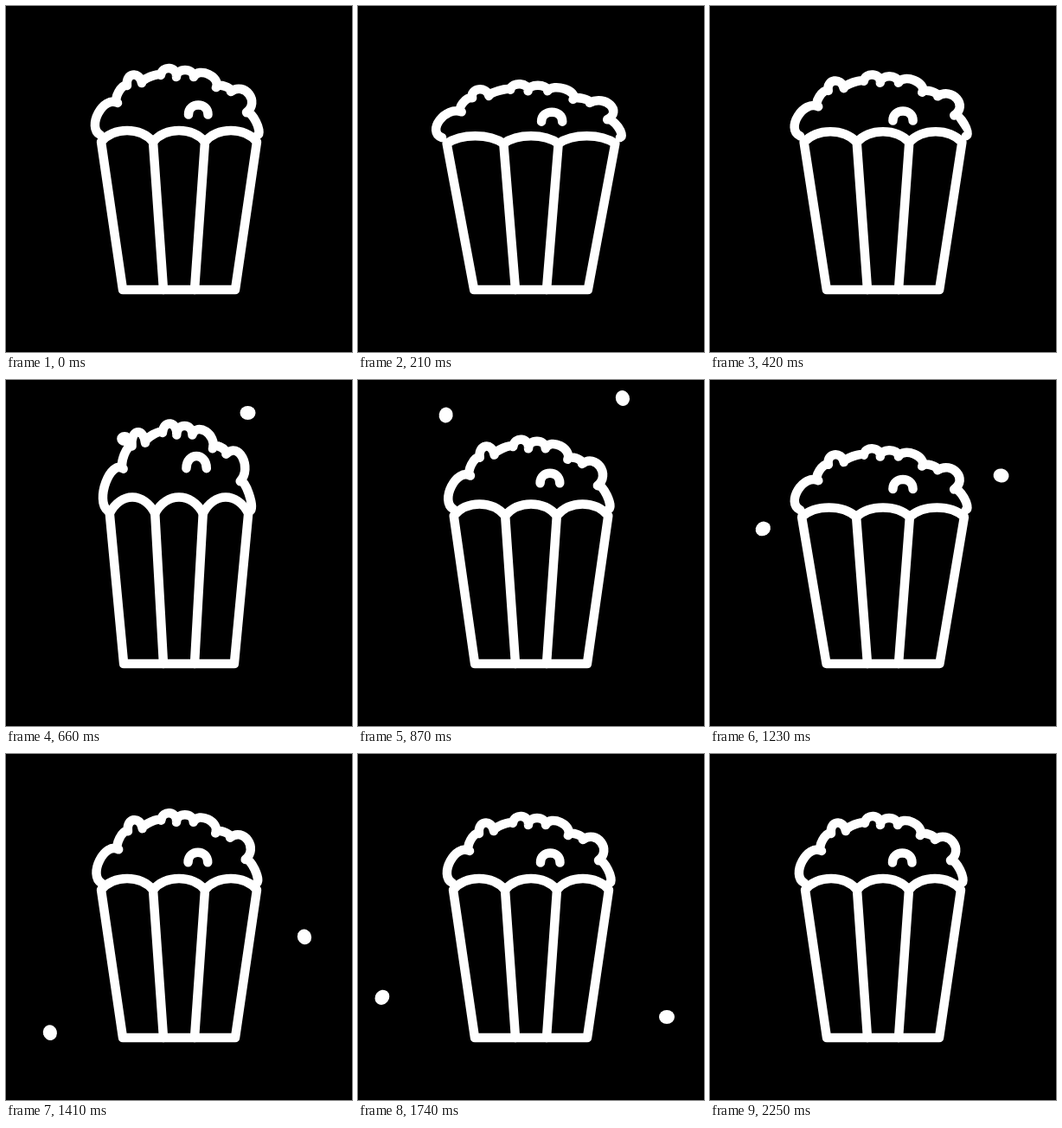
An HTML page for the animation above (2.37 s loop, 400 by 400 pixels).

```html
<!DOCTYPE html>
<html lang="en">
<head>
<meta charset="utf-8">
<title>Popcorn</title>
<style>
  html, body { margin: 0; width: 100%; height: 100%; overflow: hidden; background: #000; }
  svg { display: block; width: 100vw; height: 100vh; }
  path { fill: #000; stroke: #fff; stroke-width: 10.5; stroke-linecap: round; stroke-linejoin: round; }
  .open { fill: none; }
  ellipse { fill: #fff; }
</style>
</head>
<body>
<svg viewBox="0 0 400 400">
  <ellipse id="left" rx="9" ry="8"/>
  <ellipse id="right" rx="9" ry="8"/>
  <path id="corn"/>
  <path id="arc" class="open"/>
  <path id="cup"/>
  <path id="ribs" class="open"/>
</svg>
<script>
const LOOP = 2370, STEP = 30, LAST = 2250;
const $ = id => document.getElementById(id);

// [time, value]: positive is squashed, negative is stretched
const cupKeys = [[0, 0], [270, 1.2], [420, .2], [540, -1.1], [610, -1.5], [660, -1.4], [840, -.3], [1060, 1], [1080, 1], [1410, 0]];
const cornKeys = [[0, 0], [270, 1.25], [420, .45], [540, -1.2], [620, -1.75], [660, -1.7], [850, -.4], [1070, 1], [1080, 1], [1410, -.3], [1740, 0]];
const arcKeys = [[0, 0], [290, 10], [420, 7], [540, -13], [620, -23], [660, -22], [870, -6], [1080, 1], [1410, 0]];

// Popcorn outline: [x, y, height of the bump leading here]
const bumps = [
  [109, 149, 0], [129, 112, 14], [140, 92, 5], [157, 89, 11], [179, 80, 3], [197, 82, 9],
  [217, 82, 8], [243, 94, 10], [260, 99, 4], [278, 123, 15], [291, 149, 5]
];

// Monotone cubic interpolation
function sample(keys, t) {
  const n = keys.length;
  if (t >= keys[n - 1][0]) return keys[n - 1][1];
  let i = 0;
  while (t >= keys[i + 1][0]) i++;
  const slope = j => (keys[j + 1][1] - keys[j][1]) / (keys[j + 1][0] - keys[j][0]);
  const tangent = j => {
    if (j === 0 || j === n - 1) return 0;
    const a = slope(j - 1), b = slope(j);
    return a * b <= 0 ? 0 : 2 * a * b / (a + b);
  };
  const [t0, a] = keys[i], [t1, b] = keys[i + 1], d = t1 - t0, u = (t - t0) / d;
  const ease = u * u * (3 - 2 * u);
  return a + (b - a) * ease + d * (tangent(i) * u * (1 - u) ** 2 - tangent(i + 1) * u * u * (1 - u));
}

function cornPath(p) {
  const sx = 1 + p * (p > 0 ? .12 : .055), sy = 1 - .18 * p;
  const base = 148 + (p > 0 ? 3 * p : -p);
  const map = (x, y) => `${200 + (x - 200) * sx} ${base + (y - 148) * sy} `;
  let d = 'M' + map(bumps[0][0], bumps[0][1]);
  for (let i = 1; i < bumps.length; i++) {
    const [x0, y0] = bumps[i - 1], [x1, y1, h] = bumps[i];
    const k = h / .75 / Math.hypot(x1 - x0, y1 - y0);
    const nx = (y1 - y0) * k, ny = (x0 - x1) * k;
    d += 'C' + map(x0 + nx, y0 + ny) + map(x1 + nx, y1 + ny) + map(x1, y1);
  }
  return d;
}

function drawCup(b) {
  const top = 90 + 7 * b, foot = 65 + .8 * b, rib = 30 + 1.6 * b;
  const y = 157 + 2 * b, lift = y - (13 - 4 * b) / .75;
  const xs = [200 - top, 200 - rib, 200 + rib, 200 + top];
  let d = `M${xs[3]} ${y}L${200 + foot} 328H${200 - foot}L${xs[0]} ${y}`;
  for (let i = 0; i < 3; i++) {
    const w = (xs[i + 1] - xs[i]) * .25;
    d += `C${xs[i] + w} ${lift} ${xs[i + 1] - w} ${lift} ${xs[i + 1]} ${y}`;
  }
  $('cup').setAttribute('d', d + 'Z');
  $('ribs').setAttribute('d', `M${xs[1]} ${y}L182 328M${xs[2]} ${y}L218 328`);
}

function drawArc(q, p) {
  const x0 = 211 + (p > 0 ? p : p * 1.5), x1 = 233.5 + (p > 0 ? 2.5 * p : p);
  const y = 125.5 + q - p * (p < 0 ? -.8 : 0), h = 11 + (p < 0 ? -1.8 * p : 0);
  const c = y - h / .75;
  $('arc').setAttribute('d', `M${x0} ${y}C${x0} ${c} ${x1} ${c} ${x1} ${y}`);
}

// Flight on a parabola, then one low bounce off the stage
function leftKernel(t) {
  const s = t - 1080, r = t - 1413;
  const angle = 20 - .38 * s;
  return r < 0
    ? [75 - .106 * s + .0001 * s * s, 39.8 + .000869 * (t - 840) ** 2, angle]
    : [51 - .051 * r - .00006 * r * r, 324 - .196 * r + .0002 * r * r, angle];
}

function rightKernel(t) {
  const r = t - 1560;
  const angle = (t - 660) / 3;
  return r < 0
    ? [349.1 - 7.1e-5 * (1650 - t) ** 2, 20.3 + .000578 * (t - 835) ** 2, angle]
    : [348.5 + .031 * r + .00009 * r * r, 324 - .137 * r + .000143 * r * r, angle];
}

function place(id, t, [x, y, angle]) {
  $(id).setAttribute('transform', `translate(${x} ${y}) rotate(${angle})`);
  $(id).setAttribute('visibility', t >= 540 ? 'visible' : 'hidden');
}

function draw(now) {
  const t = Math.min(Math.floor((now % LOOP) / STEP) * STEP, LAST);
  const p = sample(cornKeys, t);
  $('corn').setAttribute('d', cornPath(p));
  drawCup(sample(cupKeys, t));
  drawArc(sample(arcKeys, t), p);
  place('left', t, leftKernel(t));
  place('right', t, rightKernel(t));
}

const start = performance.now();
function tick() {
  draw(performance.now() - start);
  requestAnimationFrame(tick);
}
tick();
</script>
</body>
</html>
```
